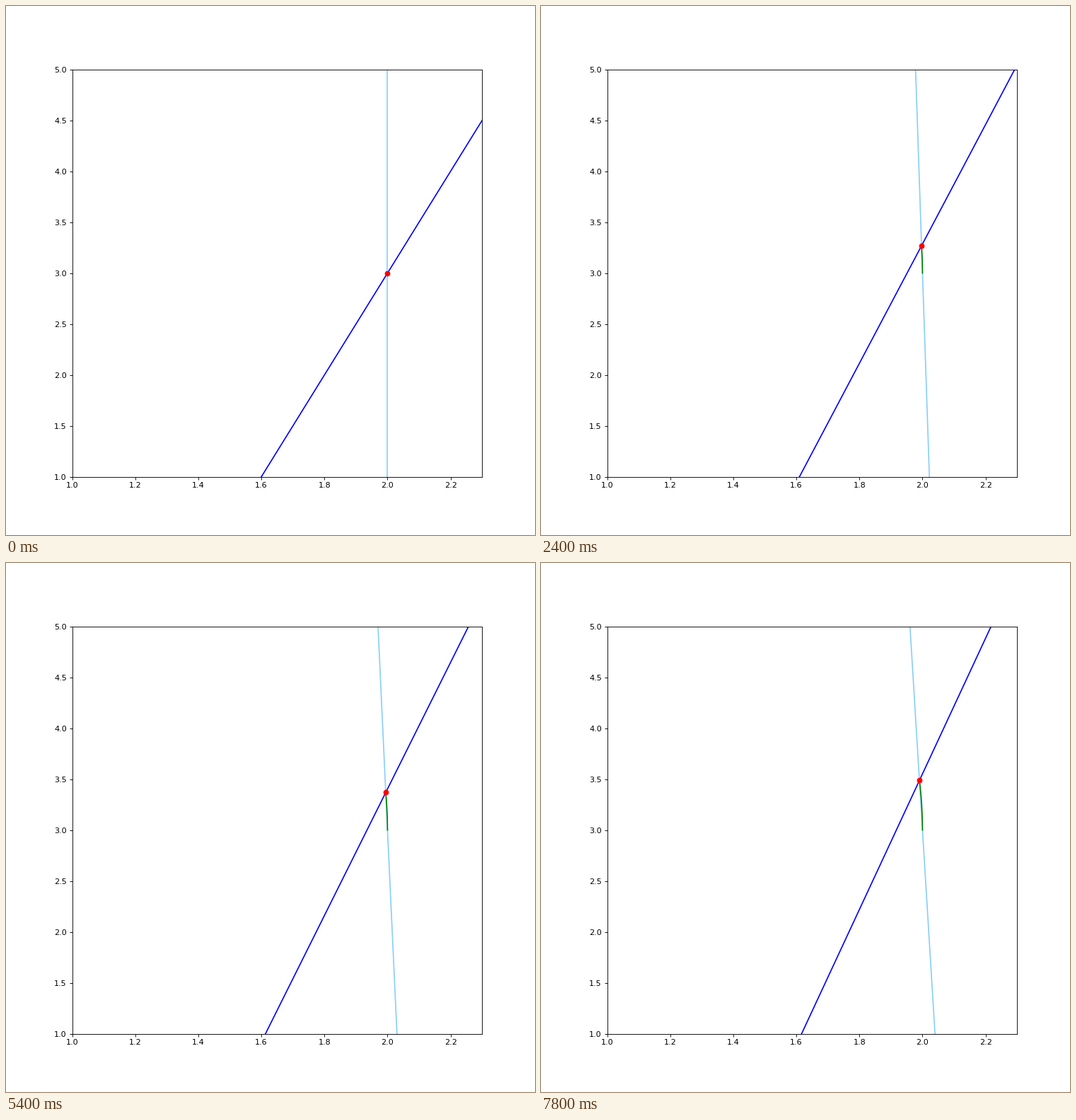
Recreate the animation shown at these times as a matplotlib script. Size 748x748 px, loop 8000 ms.

```python
import numpy as np
import matplotlib.pyplot as plt
from matplotlib.animation import FuncAnimation

START = np.array([2.0, 3.0])
PIVOT = np.array([5 / 3, 4 / 3])
BEND = 0.0406        # curvature of the traced path
TICKS_PER_STEP = 3   # each step is held for 300 ms


def rise(step):
    """Height above START: tenfold growing steps, then a slow exponential."""
    if step < 6:
        return 0.0122 * (10**step - 1) / 9999
    return 0.085 + 0.1305 * np.exp(0.0434 * step)


def path_point(height):
    return START + np.array([-BEND * height**2, height])


def line_through(point, dx_dy):
    y = np.array([0.0, 6.0])
    return point[0] + dx_dy * (y - point[1]), y


fig, ax = plt.subplots(figsize=(9.35, 9.35), dpi=80)
fig.subplots_adjust(left=0.125, right=0.9, bottom=0.11, top=0.88)
ax.set(xlim=(1, 2.3), ylim=(1, 5))

chord, = ax.plot([], [], color="lightskyblue")
ray, = ax.plot([], [], color="blue")
trail, = ax.plot([], [], color="green")
dot, = ax.plot([], [], "ro")


def update(frame):
    step = frame // TICKS_PER_STEP
    points = np.array([path_point(rise(k)) for k in range(step + 1)])
    tip = points[-1]
    dx, dy = tip - PIVOT
    chord.set_data(*line_through(START, -BEND * rise(step)))
    ray.set_data(*line_through(PIVOT, dx / dy))
    trail.set_data(points[:, 0], points[:, 1])
    dot.set_data([tip[0]], [tip[1]])
    return chord, ray, trail, dot


anim = FuncAnimation(fig, update, frames=80, interval=100, repeat=True,
                     repeat_delay=0)
plt.show()
```
